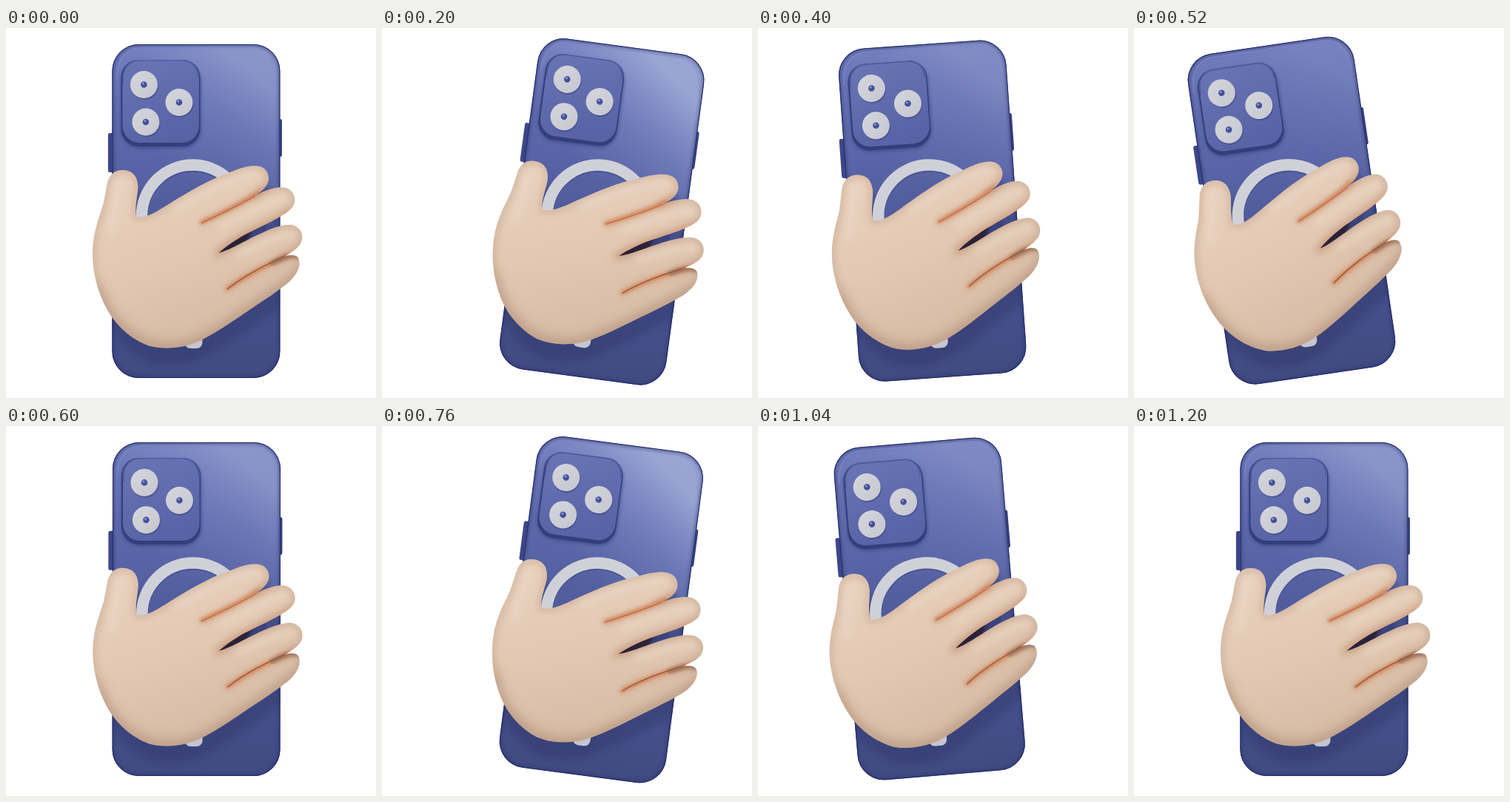
An HTML page that plays this animation: 500x500 px, repeating every 1600 ms.

```html
<!DOCTYPE html>
<html lang="en">
<head>
<meta charset="utf-8">
<title>Hand shaking a phone</title>
<style>
  html, body { margin: 0; width: 100%; height: 100%; overflow: hidden; background: #fff; }
  svg { display: block; width: 100vw; height: 100vh; }
</style>
</head>
<body>
<svg viewBox="0 0 500 500" xmlns="http://www.w3.org/2000/svg">
  <defs>
    <linearGradient id="body" x1="0" y1="0" x2="0" y2="1">
      <stop offset="0" stop-color="#6b77b8"/>
      <stop offset=".35" stop-color="#5864a6"/>
      <stop offset=".65" stop-color="#4a5492"/>
      <stop offset="1" stop-color="#414a81"/>
    </linearGradient>
    <linearGradient id="sheenFill" x1=".62" y1="0" x2=".45" y2=".42">
      <stop offset="0" stop-color="#a9b3dc"/>
      <stop offset=".4" stop-color="#8f9ad0" stop-opacity=".6"/>
      <stop offset="1" stop-color="#7b87c4" stop-opacity="0"/>
    </linearGradient>
    <linearGradient id="plate" x1=".2" y1="0" x2=".5" y2="1">
      <stop offset="0" stop-color="#6974b5"/>
      <stop offset="1" stop-color="#5863a6"/>
    </linearGradient>
    <linearGradient id="lens" x1="0" y1="0" x2="1" y2="1">
      <stop offset="0" stop-color="#d6d6dd"/>
      <stop offset="1" stop-color="#c5c6cf"/>
    </linearGradient>
    <linearGradient id="skin" gradientUnits="userSpaceOnUse" x1="190" y1="195" x2="270" y2="430">
      <stop offset="0" stop-color="#e8d1be"/>
      <stop offset=".5" stop-color="#e1c8b2"/>
      <stop offset="1" stop-color="#d5baa4"/>
    </linearGradient>
    <filter id="b2" x="-30%" y="-30%" width="160%" height="160%"><feGaussianBlur stdDeviation="2"/></filter>
    <filter id="b5" x="-30%" y="-30%" width="160%" height="160%"><feGaussianBlur stdDeviation="5"/></filter>
    <filter id="b9" x="-30%" y="-30%" width="160%" height="160%"><feGaussianBlur stdDeviation="9"/></filter>
    <clipPath id="inPhone"><rect x="144" y="22" width="227" height="451" rx="36"/></clipPath>
    <path id="handShape" d="M137 212C139 198 148 191 160 192C173 193 179 202 179 216
      C178 230 174 244 177 255C188 258 202 250 222 237C248 221 275 205 299 197
      C330 183 353 181 355.500 202C356 215 343 223 331 230C350 219 368 213 379 216
      C391 220 395 235 386 244C376 255 345 268 322 280C308 288 295 297 288 304
      C300 301 312 294 326 287C345 277 372 264 387 266C399 269 404 280 399 291
      C393 301 378 308 366 314C376 308 389 304 395 310C401 320 394 334 381 345
      C367 356 352 366 334 378C310 394 288 410 264 422C241 433 215 435 194 429.500
      C170 421 149 402 137 380C123 354 117.500 328 117.500 303C118 275 127 255 132 238
      C134 229 135 222 137 212Z"/>
    <clipPath id="inHand"><use href="#handShape"/></clipPath>
    <g id="camera">
      <circle cx="1" cy="2" r="18.500" fill="#3f498a" opacity=".6"/>
      <circle r="18.500" fill="url(#lens)"/>
      <circle r="4.300" fill="#43519a"/>
      <circle cx="-1" cy="-1.400" r="1.500" fill="#8b97d3"/>
    </g>
  </defs>

  <g id="scene">
    <rect x="138.500" y="142" width="9" height="53" rx="2.500" fill="#3c468a"/>
    <rect x="366" y="123" width="7.500" height="51" rx="2.500" fill="#353e7c"/>

    <g clip-path="url(#inPhone)">
      <rect x="144" y="22" width="227" height="451" fill="url(#body)"/>
      <rect id="sheen" x="144" y="22" width="227" height="451" fill="url(#sheenFill)"/>
      <rect x="144" y="22" width="227" height="451" rx="36" fill="none" stroke="#2c3470" stroke-width="5" opacity=".6" filter="url(#b2)"/>
      <path d="M150 70C150 42 163 27 184 27H331C352 27 365 42 365 70" fill="none" stroke="#8590cc" stroke-width="1.500" opacity=".5"/>
      <use href="#handShape" transform="translate(4 22)" fill="#2a3064" opacity=".35" filter="url(#b5)"/>

      <rect x="156" y="46" width="108" height="116" rx="25" fill="#2f3873" opacity=".6" filter="url(#b2)"/>
      <rect x="156" y="43" width="107" height="117" rx="24" fill="#343e7c"/>
      <rect x="158" y="43" width="103.500" height="112" rx="23" fill="url(#plate)"/>
      <path d="M159 76V67C159 53 168 44 182 44H238C252 44 260 53 260 67" fill="none" stroke="#414c8c" stroke-width="1.200" opacity=".7"/>
      <use href="#camera" x="187" y="76.500"/>
      <use href="#camera" x="234.500" y="100.500"/>
      <use href="#camera" x="189.500" y="127"/>

      <circle cx="253" cy="256" r="69" fill="none" stroke="#3f4988" stroke-width="16" opacity=".5"/>
      <circle cx="253" cy="254" r="69" fill="none" stroke="#d0d1d8" stroke-width="15.500"/>
      <rect x="242" y="398" width="24" height="35" rx="8" fill="#c5c6cf"/>
      <path d="M280 308L318 270L352 258L352 276L295 306Z" fill="#3a437c"/>
      <path d="M280 308L312 276L334 270L326 290L295 306Z" fill="#2b2237" filter="url(#b2)"/>
    </g>
    <rect x="144.500" y="22.500" width="226" height="450" rx="35.500" fill="none" stroke="#232b66"/>

    <use href="#handShape" fill="url(#skin)"/>
    <g clip-path="url(#inHand)" fill="none" stroke-linecap="round">
      <use href="#handShape" stroke="#b58f76" stroke-width="7" opacity=".45" filter="url(#b5)"/>
      <path d="M122 350C145 420 205 445 262 425C305 400 350 370 396 334" stroke="#a88570" stroke-width="13" opacity=".5" filter="url(#b9)"/>
      <g stroke="#d08a63" stroke-width="7" opacity=".6" filter="url(#b5)">
        <path d="M266 263C295 249 325 236 352 215"/>
        <path d="M288 304C315 282 350 268 388 247"/>
        <path d="M300 352C325 333 360 318 396 302"/>
      </g>
      <g stroke="#ecd8c7" stroke-width="10" opacity=".6" filter="url(#b5)">
        <path d="M230 243C265 224 300 205 338 196"/>
        <path d="M290 268C320 254 350 237 378 228"/>
        <path d="M315 305C340 295 365 281 388 278"/>
        <path d="M153 210C150 230 147 250 143 275"/>
      </g>
      <g stroke="#cf7444" stroke-width="4" opacity=".8" filter="url(#b2)">
        <path d="M264 263C290 251 318 237 342 222"/>
        <path d="M299 353C325 334 355 319 382 307"/>
      </g>
      <path d="M265 263.500C291 251 315 240 337 227" stroke="#b5663f" stroke-width="1.500" opacity=".75"/>
      <path d="M300 352.500C325 333 350 321 380 307" stroke="#9c5533" stroke-width="1.600" opacity=".85"/>
      <path d="M360 318C377 309 388 305 396 309" stroke="#7d5e50" stroke-width="6" opacity=".65" filter="url(#b2)"/>
    </g>
  </g>
</svg>
<script>
const STEP = 40, LOOP = 1600, LAST = 30;
// Extremes of the swing: [step, degrees]
const keys = [[0, 0], [6.45, 9.8], [12, -9.85], [17.9, 9.5], [23.4, -9.7], [LAST, 0]];
const scene = document.getElementById('scene');
const sheen = document.getElementById('sheen');

const smooth = s => s * s * (3 - 2 * s);
const soft = s => smooth(Math.pow(s, 1.4));

function angleAt(step) {
  if (step >= LAST) return 0;
  const i = keys.findIndex(k => k[0] > step);
  const [t0, a] = keys[i - 1], [t1, b] = keys[i];
  const s = (step - t0) / (t1 - t0);
  // Leave and reach the rest pose more gently than the swings in between
  const e = i === 1 ? soft(s) : i === keys.length - 1 ? 1 - soft(1 - s) : smooth(s);
  return a + (b - a) * e;
}

function draw(ms) {
  const a = angleAt(Math.floor((ms % LOOP) / STEP));
  const x = 5.25 * a - 0.6, y = 0.1 * a;
  scene.setAttribute('transform',
    `translate(${x.toFixed(3)} ${y.toFixed(3)}) rotate(${a.toFixed(3)} 257.5 247.5)`);
  // Leaning right turns the back towards the light
  sheen.setAttribute('opacity', (0.5 + 0.035 * a).toFixed(3));
}

const start = performance.now();
function tick(now) {
  draw(Math.max(0, now - start));
  requestAnimationFrame(tick);
}
draw(0);
requestAnimationFrame(tick);
</script>
</body>
</html>
```
